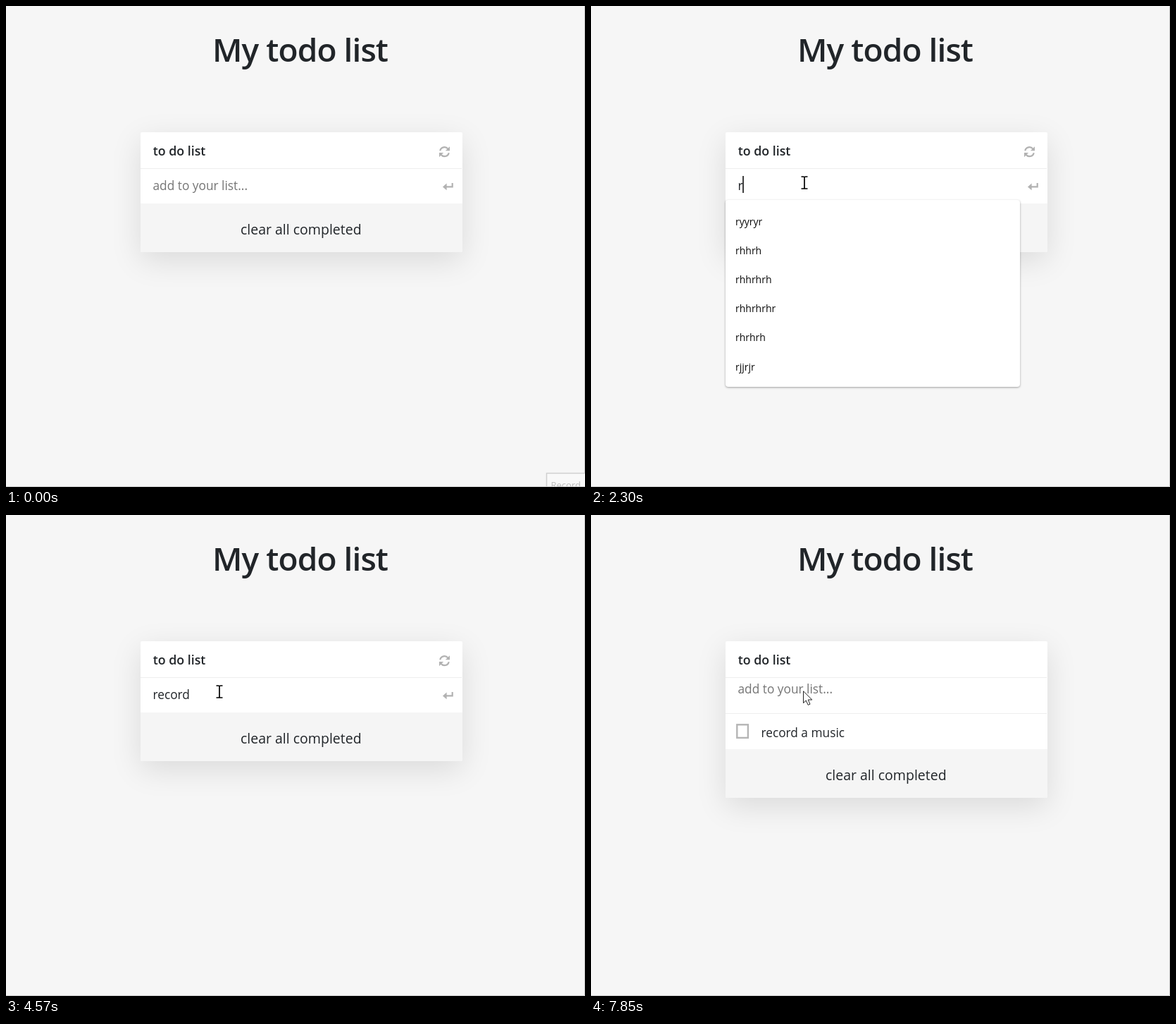
These frames come from a looping animation (822 by 682 pixels, 8 s). An HTML page:

```html
<!DOCTYPE html>
<html lang="en">
<head>
<meta charset="utf-8">
<title>My todo list</title>
<style>
  html, body { margin: 0; width: 100%; height: 100%; overflow: hidden; background: #f6f6f6; }
  #stage { position: relative; width: 822px; height: 682px; overflow: hidden; }
  #stage > * { position: absolute; }
  svg { left: 0; top: 0; }
  text { font-family: "Open Sans", "Noto Sans", sans-serif; fill: #212529; white-space: pre; }
  #card {
    left: 190.5px; top: 179px; width: 457px; border-radius: 2px; overflow: hidden;
    background: #fff; box-shadow: 0 12px 44px rgba(0, 0, 0, .115);
  }
  #footer { position: absolute; bottom: 0; width: 100%; height: 69px; background: #f5f5f5; }
  #menu {
    left: 191px; top: 275px; width: 418px; height: 265px; border-radius: 4px;
    background: #fff; box-shadow: 0 1px 3px rgba(0, 0, 0, .36);
  }
  #menu div {
    position: absolute; left: 14px; height: 20px; color: #0c0c0c;
    font: 500 14px/20px "Open Sans", "Noto Sans", sans-serif;
  }
  .icon { fill: #b2b2b2; }
  .icon path[fill=none] { stroke: #b2b2b2; stroke-width: 2.2; }
</style>
</head>
<body>
<div id="stage">
  <div id="card"><div id="footer"></div></div>

  <svg width="822" height="682" viewBox="0 0 822 682">
    <text x="293" y="79" font-size="46" font-weight="600" letter-spacing="-.02em">My todo list</text>
    <text x="208.7" y="212" font-size="17.8" font-weight="600">to do list</text>
    <path d="M191 230.5H647" stroke="#eee"/>
    <text id="field" x="208.5" y="261" font-size="17.3"></text>
    <text id="clear" x="418.8" y="324" font-size="19.5" text-anchor="middle">clear all completed</text>

    <g id="icons" class="icon">
      <g id="half">
        <path fill="none" d="M616.3 205.2A6.3 6.3 0 0 1 627.4 202.6"/>
        <path d="M630 199.2V205.3H623.9Z"/>
      </g>
      <use href="#half" transform="rotate(180 622.5 206.7)"/>
      <path fill="none" d="M624.5 256.4H633.7V251"/>
      <path d="M620 256.4L625.6 251.6V261.2Z"/>
    </g>

    <g id="item">
      <path d="M191 281.5H647" stroke="#eee"/>
      <rect x="207.3" y="297.3" width="15.6" height="18.6" fill="none" stroke="#b5b5b5" stroke-width="2.4"/>
      <text x="241.5" y="315" font-size="17.3">record a music</text>
    </g>

    <rect id="caret" y="241" width="1.5" height="24" fill="#000"/>

    <path d="M821.5 0V681.5H0" fill="none" stroke="#c8c8c8"/>
    <g id="tip">
      <rect x="767.5" y="662.5" width="56" height="30" fill="#f9f9f9" stroke="#cfcfcf" stroke-width="1.5"/>
      <text x="773.5" y="684" font-size="13" style="fill:#bdbdbd">Record</text>
      <path d="M767 681.5H822" stroke="#c8c8c8"/>
    </g>

    <path id="arrow" d="M.5 .8V17.6L4.3 14L7.2 20.4L10 19.2L7.2 13H12.8Z"
      fill="#fff" stroke="#222" stroke-linejoin="round"/>
    <path id="beam" d="M-4.5 -8.5H-1.5Q0 -8.5 0 -7V7Q0 8.5 -1.5 8.5H-4.5M4.5 -8.5H1.5Q0 -8.5 0 -7M4.5 8.5H1.5Q0 8.5 0 7"
      fill="none" stroke="#000" stroke-width="1.7"/>
  </svg>

  <div id="menu"></div>
</div>

<script>
const LOOP = 8000;
const PROMPT = 'add to your list...';
const KEY = 280;      // time between letters of a word
const BLINK = 520;    // caret half period
const FOCUS = 1520, ENTER = 7310, ADDED = 7850;
const words = [
  { text: 'record ', start: 2300 },
  { text: 'a ', start: 4640 },
  { text: 'music', start: 5430 }
];
const matches = ['ryyryr', 'rhhrh', 'rhhrhrh', 'rhhrhrhr', 'rhrhrh', 'rjjrjr'];
const recent = [...matches].reverse();

const $ = id => document.getElementById(id);
const show = (id, on) => { $(id).style.display = on ? '' : 'none'; };
const clamp = v => Math.max(0, Math.min(1, v));

const rows = matches.map((_, i) => {
  const row = document.createElement('div');
  row.style.top = 21 + i * 41.1 + 'px';
  return $('menu').appendChild(row);
});

// Text entered so far and the time of the latest key
function typed(t) {
  let text = '', last = FOCUS;
  for (const word of words) {
    if (t < word.start) break;
    const count = Math.min(word.text.length, Math.floor((t - word.start) / KEY) + 1);
    text += word.text.slice(0, count);
    last = word.start + (count - 1) * KEY;
  }
  return { text, last };
}

function pointer(t) {
  if (t < 370) return {};
  if (t < 450) return { shape: 'arrow', x: 451, y: 409 };
  if (t < 720) return { shape: 'arrow', x: 307, y: 298 };
  if (t >= ENTER) return { shape: 'arrow', x: 301, y: 249 };
  // Swing left, then settle over the input, in five steps
  const k = clamp((Math.floor((t - 720) / 65) + 1) / 5), r = 1 - k;
  return {
    shape: 'beam',
    x: 307 * r * r + 2 * 225 * r * k + 303 * k * k,
    y: 250.5 + 47.5 * r * r
  };
}

function drawField(t, added) {
  const { text, last } = typed(t);
  const filled = text && !added;
  const field = $('field');
  field.textContent = filled ? text : PROMPT;
  field.style.fill = filled ? '#212529' : '#757575';
  field.setAttribute('y', added ? 252.5 : 261);

  const lit = (t - last) % (2 * BLINK) < BLINK;
  show('caret', t >= FOCUS && t < ENTER && lit);
  $('caret').setAttribute('x', 208.2 + (filled ? field.getComputedTextLength() : 0));
}

function draw(t) {
  const added = t >= ADDED;
  drawField(t, added);
  $('clear').setAttribute('y', added ? 376 : 324);
  $('card').style.height = (added ? 222 : 170) + 'px';
  show('item', added);
  show('icons', !added);
  show('tip', t < 70);

  const { shape, x, y } = pointer(t);
  for (const id of ['arrow', 'beam']) show(id, id === shape);
  if (shape) $(shape).setAttribute('transform', `translate(${x} ${y})`);

  $('menu').style.opacity = t < FOCUS ? 0 : clamp((2770 - t) / 260);
  const list = t < words[0].start ? recent : matches;
  rows.forEach((row, i) => { row.textContent = list[i]; });
}

const start = performance.now();
function tick() {
  draw((performance.now() - start) % LOOP);
  requestAnimationFrame(tick);
}
tick();
</script>
</body>
</html>
```
